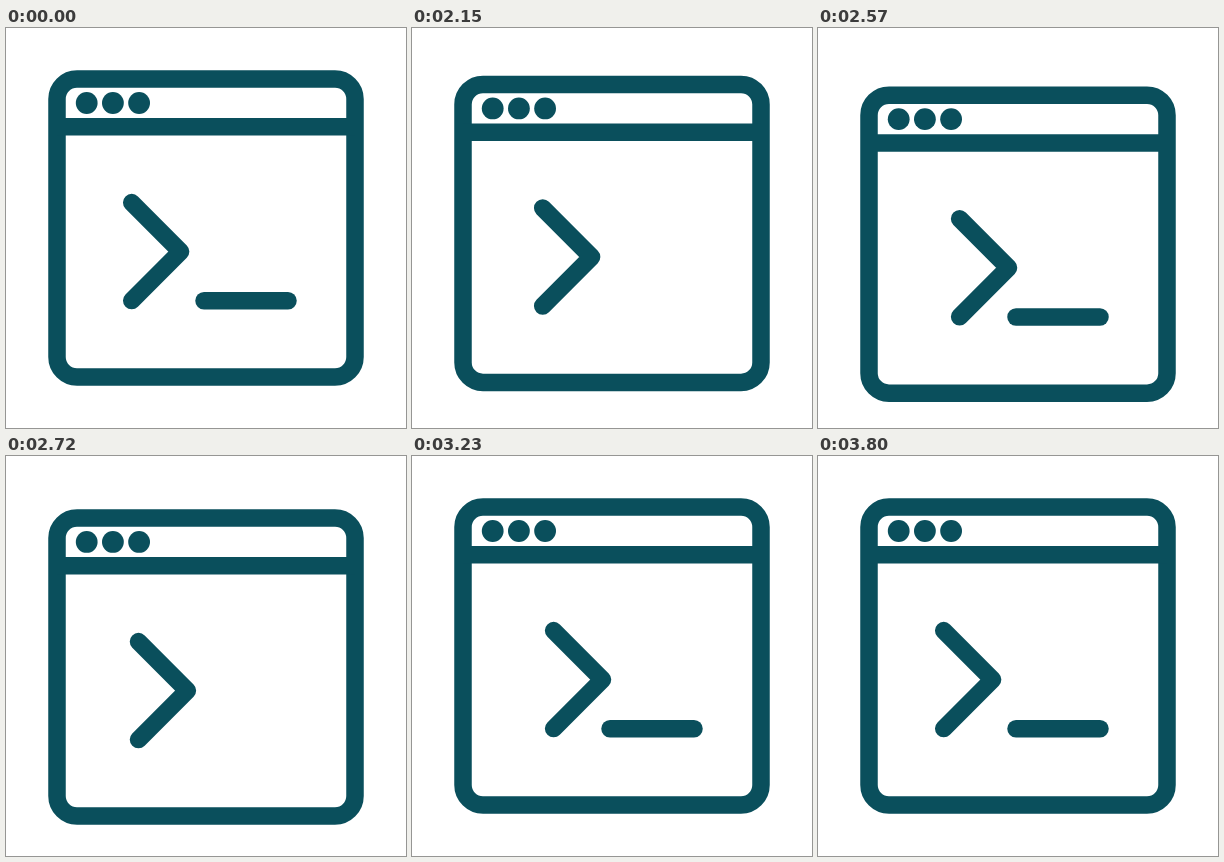
An HTML page for the animation above (3830 ms loop, 400x400 px).

```html
<!DOCTYPE html>
<html lang="en">
<head>
<meta charset="utf-8">
<title>Console icon</title>
<style>
  html, body { margin: 0; width: 100%; height: 100%; overflow: hidden; background: #fff; }
  svg { display: block; width: 100%; height: 100%; }
  .line { fill: none; stroke: #0a4f5c; stroke-width: 17.5; stroke-linecap: round; stroke-linejoin: round; }
  .dot { fill: #0a4f5c; }
</style>
</head>
<body>
<svg viewBox="0 0 400 400">
  <g id="win">
    <rect class="line" x="51" y="51" width="298" height="298" rx="20"/>
    <path class="line" d="M51 98.75H349" style="stroke-linecap: butt"/>
    <circle class="dot" cx="80.7" cy="75" r="10.9"/>
    <circle class="dot" cx="106.9" cy="75" r="10.9"/>
    <circle class="dot" cx="133.1" cy="75" r="10.9"/>
    <path class="line" id="prompt" d="M125.7 174.6L174.6 223.6L125.7 272.6"/>
    <path class="line" id="cursor" d="M198 272.8H282"/>
  </g>
</svg>
<script>
  const LOOP = 3830, REST = 2000, TICK = 30;
  const DROP = 17.5, PUSH = 19.3;
  const [win, prompt_, cursor] = ['win', 'prompt', 'cursor'].map(id => document.getElementById(id));

  // Eased progress from a to b, clamped to 0..1
  const ease = (n, a, b) => {
    const u = Math.min(1, Math.max(0, (n - a) / (b - a)));
    return u * u * (3 - 2 * u);
  };

  const shift = (el, x, y) => el.setAttribute('transform', `translate(${x.toFixed(2)} ${y.toFixed(2)})`);

  function draw(now) {
    // Motion advances in whole ticks after the rest
    const n = Math.max(0, Math.floor((now % LOOP - REST) / TICK));
    const drop = ease(n, 0, 13.5) - ease(n, 15.5, 36);
    const push = ease(n, 0, 15) - ease(n, 15, 30) + ease(n, 30, 45) - ease(n, 45, 60);
    const blink = n % 20 >= 4 && n % 20 < 14;

    shift(win, 0, DROP * drop);
    shift(prompt_, PUSH * push, 0);
    cursor.setAttribute('visibility', blink ? 'hidden' : 'visible');
  }

  const start = performance.now();
  function loop() {
    draw(performance.now() - start);
    requestAnimationFrame(loop);
  }
  loop();
</script>
</body>
</html>
```
